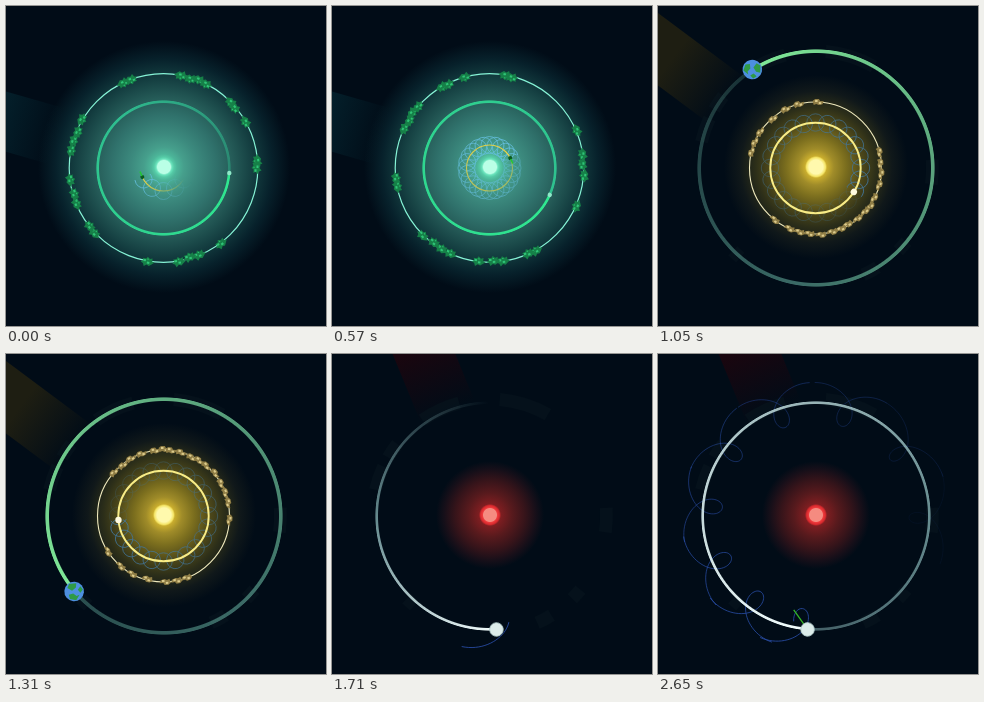
Write an HTML page without scripts that moves like this. It is 320 by 320 pixels and loops after 2.75 s.

```html
<!DOCTYPE html>
<html lang="en">
<head>
<meta charset="utf-8">
<title>Orbits</title>
<style>
/* One stepped clock drives every part. */
@property --i { syntax: "<number>"; inherits: true; initial-value: 0; }
@keyframes clock {
  0% { --i: 0; animation-timing-function: step-end; }
  1.78% { --i: 0; animation-timing-function: steps(130); }
  96.33%, 100% { --i: 130; }
}
html { animation: clock 2750ms infinite; }
html, body { margin: 0; width: 100%; height: 100%; overflow: hidden; background: #010c17; }
body { position: relative; }
section, section > *, .traced > svg { position: absolute; inset: 0; }
section {
  --x: 157.5px; --y: 162px;
  width: 320px; height: 320px; overflow: hidden;
  opacity: clamp(0, min(var(--i) - var(--from), var(--to) - var(--i)) * 99, 1);
  background: radial-gradient(circle at 158px 161px, var(--glow));
}
svg { width: 320px; height: 320px; fill: none; }

#green {
  --from: -1; --to: 42.5; --beam: #04222d; --dir: 196deg;
  --a: calc(var(--i) * 13.09deg + 265.6deg);
  --T: calc(var(--i) * 13.09deg + 450deg);
  --p: calc(var(--i) * 20.67deg + 247deg);
  --len: calc(var(--i) * 20.67deg + 130deg);
  --R: 67.7; --w: 3; --c: #30e890; --mid: rgb(50 228 165 / .7);
  --spin: calc(var(--i) * -16.77deg);
  --glow: #baffe6 6.5px, #6ae3bc 8px, #55caa6 10px, #4cb599 13px, #469f8c 20px, #3c8a7e 33px,
    #30726c 52px, #265d59 68px, #133c3f 90px, #07212b 108px, #010c17 126px;
}
#yellow {
  --from: 42.5; --to: 82.5; --beam: #1e1e12; --dir: 216.7deg;
  --a: calc(var(--i) * 7.5deg + 17.7deg);
  --T: calc(var(--a) + 50deg);
  --p: calc(var(--i) * 11deg - 428deg);
  --len: 430deg;
  --R: 119; --w: 4; --c: #80ea98; --mid: rgb(98 170 155 / .6);
  --spin: calc((var(--i) - 63) * -9.6deg);
  --glow: #fff9ad 7px, #f5e568 9.5px, #c9ad2e 11px, #a08c29 18px, #7b6e1e 30px,
    #504a1a 45px, #2d2f19 60px, #10181a 76px, #010c17 92px;
}
#red {
  --from: 82.5; --to: 999; --beam: #19060f; --dir: 247.7deg;
  --a: calc(var(--i) * 7.5deg - 439deg);
  --R: 115; --w: 3; --c: #f4ffff; --mid: rgb(160 212 212 / .64);
  --glow: #f58b80 6.5px, #ee3a3c 7.5px, #d6292d 9.5px, #7e1e21 11px, #581a1d 22px,
    #36141a 35px, #160f19 46px, #010c17 54px;
}

section > .beam {
  inset: 132px auto auto 158px; width: 260px; height: 58px;
  transform-origin: 0 50%; transform: rotate(var(--dir));
  background: linear-gradient(90deg, #0000 112px, var(--beam) 180px);
}
section > .trail {
  --d: calc(var(--R) * 2px);
  inset: calc(var(--y) - var(--R) * 1px) auto auto calc(var(--x) - var(--R) * 1px);
  width: var(--d); height: var(--d);
  background: conic-gradient(from calc(var(--a) * -1), var(--c) 0deg,
    var(--mid) calc(var(--T, var(--a)) * .5), #0000 var(--T, var(--a)));
  -webkit-mask: radial-gradient(closest-side, #0000 calc(100% - var(--w) * 1px - .5px),
    #000 calc(100% - var(--w) * 1px + .5px), #000 calc(100% - .8px), #0000);
}
.traced {
  -webkit-mask: conic-gradient(from var(--p) at var(--x) var(--y),
    #0000 calc(360deg - var(--len)), #000 360deg);
}
.planet { transform: rotate(calc(var(--a) * -1)); }
.inner { transform: rotate(var(--p)); }
.belt { transform: rotate(var(--spin)); }
.second { opacity: clamp(0, (var(--i) - 10) / 12, 1); }

/* The moon's loops crowd together as its spin speeds up. */
.lobe {
  --f: calc(188 + var(--k) * (42 - .76 * var(--k)));
  --age: calc(var(--i) - 83 - (var(--f) - var(--half, 16.5) - 183.5) / 7.5);
  stroke-dasharray: 100 200;
  stroke-dashoffset: calc(100px - 100px * clamp(0, var(--age) * 3.75 / var(--half, 16.5), 1));
  opacity: clamp(0, 1 - var(--age) / 42, 1);
  transform: rotate(calc(var(--f) * -1deg));
}
.wide { --half: 20; }
.arm {
  opacity: clamp(0, (var(--i) - 83) / 4, 1);
  transform: rotate(calc((var(--i) - 102) * -86.46deg + 41.7deg));
}
</style>
</head>
<body>
<svg width="0" height="0" style="position:absolute;width:0;height:0">
  <defs>
    <g id="bush" transform="scale(1.25 1)">
      <path fill="#168048" d="M-4-2l2-2 2 1 2-2 1 3 2 1-2 2 1 2-3 0-1 2-2-2-2 1 0-3-2-1z"/>
      <path fill="#2fc477" d="M-2-2h2v2h-2zM1 0h2v2h-2zM-1 2h1v1h-1z"/>
    </g>
    <g id="rock" transform="scale(1.25 1)">
      <path fill="#8f7d45" d="M-4-1l2-2 3 0 1 2 3 0-1 3-3 1-2-1-2 1z"/>
      <path fill="#dccb8c" d="M-2-2h2v2h-2zM1 0h2v2h-2z"/>
    </g>
    <g id="petals3">
      <circle id="petal" cy="-23" r="8.5"/>
      <use href="#petal" transform="rotate(30)"/>
      <use href="#petal" transform="rotate(60)"/>
    </g>
    <g id="flower">
      <use href="#petals3"/>
      <use href="#petals3" transform="rotate(90)"/>
      <use href="#petals3" transform="rotate(180)"/>
      <use href="#petals3" transform="rotate(270)"/>
    </g>
    <g id="scallop3">
      <circle id="scallop" cy="-45.5" r="8.7"/>
      <use href="#scallop" transform="rotate(15)"/>
      <use href="#scallop" transform="rotate(30)"/>
    </g>
    <g id="scallop6">
      <use href="#scallop3"/>
      <use href="#scallop3" transform="rotate(45)"/>
    </g>
    <path id="wide" pathLength="100" d="M45.7-125.4C27.7-132 9-126.1 0-115.3S-5.3-93.5 0-93.5 8.9-104.5 0-115.3-27.7-132-45.7-125.4"/>
    <path id="slim" pathLength="100" d="M37.9-128C20.9-133 3.7-126.2-3.6-115.2S-6.3-93.5 0-93.5 10.9-104.2 3.6-115.2-20.9-133-37.9-128"/>
    <circle id="ghost" r="117" stroke="#0a1b22" stroke-width="13" opacity=".4" pathLength="360" transform="rotate(-4)"
      stroke-dasharray="12 31 6 13 8 64 5 58 12 5 8 17 20 20 25 56"/>
  </defs>
</svg>

<section id="green">
  <div class="beam"></div>
  <div class="trail"></div>
  <div class="traced">
    <svg viewBox="-157.5 -162 320 320">
      <g stroke="#66bfe0" stroke-width=".8">
        <use href="#flower"/>
        <use href="#flower" class="second" transform="rotate(15)"/>
      </g>
      <circle r="23" stroke="#f0d544" stroke-width="1.1"/>
    </svg>
  </div>
  <svg viewBox="-157.5 -162 320 320">
    <circle r="94.3" stroke="#86f3d6" stroke-width="1.2"/>
    <g class="belt">
      <use href="#bush" transform="rotate(11) translate(0 -94)"/>
      <use href="#bush" transform="rotate(17) translate(0 -93)"/>
      <use href="#bush" transform="rotate(22) translate(0 -95)"/>
      <use href="#bush" transform="rotate(27) translate(0 -94)"/>
      <use href="#bush" transform="rotate(46) translate(0 -94)"/>
      <use href="#bush" transform="rotate(50) translate(0 -93)"/>
      <use href="#bush" transform="rotate(61) translate(0 -94)"/>
      <use href="#bush" transform="rotate(86) translate(0 -94)"/>
      <use href="#bush" transform="rotate(90) translate(0 -93)"/>
      <use href="#bush" transform="rotate(143) translate(0 -95)"/>
      <use href="#bush" transform="rotate(158) translate(0 -94)"/>
      <use href="#bush" transform="rotate(164) translate(0 -93)"/>
      <use href="#bush" transform="rotate(171) translate(0 -95)"/>
      <use href="#bush" transform="rotate(190) translate(0 -95)"/>
      <use href="#bush" transform="rotate(227) translate(0 -95)"/>
      <use href="#bush" transform="rotate(232) translate(0 -94)"/>
      <use href="#bush" transform="rotate(248) translate(0 -94)"/>
      <use href="#bush" transform="rotate(254) translate(0 -93)"/>
      <use href="#bush" transform="rotate(263) translate(0 -94)"/>
      <use href="#bush" transform="rotate(281) translate(0 -94)"/>
      <use href="#bush" transform="rotate(287) translate(0 -94)"/>
      <use href="#bush" transform="rotate(293) translate(0 -93)"/>
      <use href="#bush" transform="rotate(301) translate(0 -95)"/>
      <use href="#bush" transform="rotate(335) translate(0 -94)"/>
      <use href="#bush" transform="rotate(340) translate(0 -94)"/>
    </g>
    <g class="planet"><circle cy="-66" r="2.2" fill="#8fe8c9"/></g>
    <g class="inner" fill="#0a5a20">
      <circle cy="-23" r="2"/>
      <path stroke="#22c832" stroke-width="1.5" d="M1-23h5"/>
    </g>
  </svg>
</section>

<section id="yellow">
  <div class="beam"></div>
  <svg viewBox="-157.5 -162 320 320"><use href="#ghost"/></svg>
  <div class="trail"></div>
  <div class="traced">
    <svg viewBox="-157.5 -162 320 320" stroke="#43789f" stroke-width=".8">
      <use href="#scallop6"/>
      <use href="#scallop6" transform="rotate(90)"/>
      <use href="#scallop6" transform="rotate(180)"/>
      <use href="#scallop6" transform="rotate(270)"/>
    </svg>
  </div>
  <svg viewBox="-157.5 -162 320 320">
    <circle r="45.2" stroke="#f8ec86" stroke-width="1.9"/>
    <circle r="66" stroke="#efe9bd" stroke-width="1.1"/>
    <g class="belt">
      <use href="#rock" transform="rotate(-49) translate(0 -66)"/>
      <use href="#rock" transform="rotate(-39) translate(0 -65)"/>
      <use href="#rock" transform="rotate(-30) translate(0 -66)"/>
      <use href="#rock" transform="rotate(-20) translate(0 -66)"/>
      <use href="#rock" transform="rotate(-8) translate(0 -66)"/>
      <use href="#rock" transform="rotate(0) translate(0 -67)"/>
      <use href="#rock" transform="rotate(6) translate(0 -66)"/>
      <use href="#rock" transform="rotate(15) translate(0 -66)"/>
      <use href="#rock" transform="rotate(25) translate(0 -65)"/>
      <use href="#rock" transform="rotate(32) translate(0 -66)"/>
      <use href="#rock" transform="rotate(40) translate(0 -66)"/>
      <use href="#rock" transform="rotate(50) translate(0 -67)"/>
      <use href="#rock" transform="rotate(60) translate(0 -66)"/>
      <use href="#rock" transform="rotate(69) translate(0 -66)"/>
      <use href="#rock" transform="rotate(78) translate(0 -66)"/>
      <use href="#rock" transform="rotate(93) translate(0 -66)"/>
      <use href="#rock" transform="rotate(159) translate(0 -66)"/>
      <use href="#rock" transform="rotate(168) translate(0 -66)"/>
      <use href="#rock" transform="rotate(178) translate(0 -66)"/>
      <use href="#rock" transform="rotate(194) translate(0 -65)"/>
      <use href="#rock" transform="rotate(208) translate(0 -66)"/>
      <use href="#rock" transform="rotate(220) translate(0 -66)"/>
      <use href="#rock" transform="rotate(237) translate(0 -66)"/>
    </g>
    <g class="inner"><circle cy="-45.2" r="3.2" fill="#fffbe0"/></g>
    <g class="planet">
      <g transform="translate(0 -117)">
        <circle r="9.8" fill="#4d8fe0"/>
        <path fill="#2f9a45" d="M-8-4l5-4 4 2-2 4-4 1-1 3zM2-1l5-2 2 4-4 6-3-3zM-5 4l4 0 1 4-4 0z"/>
      </g>
    </g>
  </svg>
</section>

<section id="red">
  <div class="beam"></div>
  <svg viewBox="-157.5 -162 320 320">
    <use href="#ghost"/>
    <g stroke="#2c52b0" stroke-width=".8">
      <use href="#wide" class="lobe wide" style="--k:0"/>
      <use href="#wide" class="lobe wide" style="--k:1"/>
      <use href="#wide" class="lobe wide" style="--k:2"/>
      <use href="#wide" class="lobe wide" style="--k:3"/>
      <use href="#slim" class="lobe" style="--k:4"/>
      <use href="#slim" class="lobe" style="--k:5"/>
      <use href="#slim" class="lobe" style="--k:6"/>
      <use href="#slim" class="lobe" style="--k:7"/>
      <use href="#slim" class="lobe" style="--k:8"/>
      <use href="#slim" class="lobe" style="--k:9"/>
      <use href="#slim" class="lobe" style="--k:10"/>
    </g>
  </svg>
  <div class="trail"></div>
  <svg viewBox="-157.5 -162 320 320">
    <g class="planet">
      <g transform="translate(0 -113.7)">
        <path class="arm" stroke="#35b828" stroke-width="1.3" d="M0 0V-24"/>
        <circle r="6.8" fill="#dcecea" stroke="#a9c4c4" stroke-width=".8"/>
      </g>
    </g>
  </svg>
</section>
</body>
</html>
```
